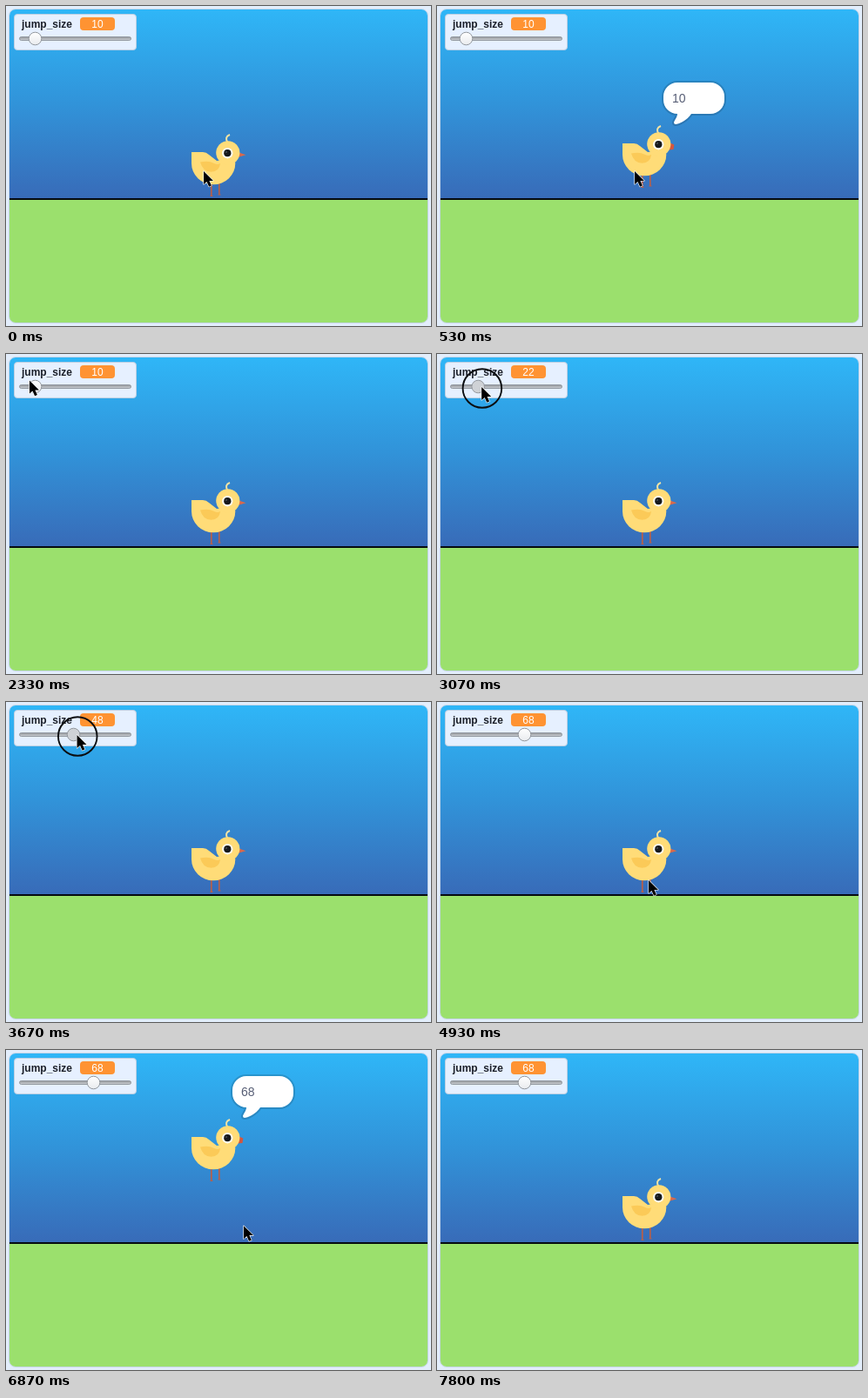
An HTML page for the animation above (7990 ms loop, 488 by 368 pixels).

```html
<!DOCTYPE html>
<html lang="en">
<head>
<meta charset="utf-8">
<title>Jumping chick</title>
<style>
  html, body { margin: 0; width: 100%; height: 100%; overflow: hidden; background: #e3eefc; }
  svg { display: block; width: 488px; height: 368px; }
  text { font-family: "Liberation Sans", Arial, sans-serif; }
</style>
</head>
<body>
<svg viewBox="0 0 488 368">
  <defs>
    <linearGradient id="sky" x1="0" y1="0" x2="0" y2="1">
      <stop offset="0" stop-color="#2fb6f7"/>
      <stop offset=".5" stop-color="#3193d9"/>
      <stop offset="1" stop-color="#386bb8"/>
    </linearGradient>
    <linearGradient id="groove" x1="0" y1="0" x2="0" y2="1">
      <stop offset="0" stop-color="#8f9296"/>
      <stop offset="1" stop-color="#cfd3d8"/>
    </linearGradient>
    <linearGradient id="knob" x1="0" y1="0" x2="0" y2="1">
      <stop offset="0" stop-color="#ffffff"/>
      <stop offset="1" stop-color="#e9ebee"/>
    </linearGradient>
    <clipPath id="stage"><rect x="4" y="4" width="480" height="360" rx="7"/></clipPath>
  </defs>

  <rect width="488" height="368" fill="#e3eefc"/>
  <rect x="3.5" y="3.5" width="481" height="361" rx="7.5" fill="none" stroke="#c5d5e8"/>
  <g clip-path="url(#stage)">
    <rect x="4" y="4" width="480" height="218" fill="url(#sky)"/>
    <rect x="4" y="222" width="480" height="142" fill="#9be06d"/>
    <rect x="4" y="221" width="480" height="2" fill="#050a10"/>
  </g>

  <g id="chick">
    <g fill="none" stroke="#b85f48" stroke-width="1.7">
      <path d="M235.8 203V218.5M244.8 203V217"/>
      <path d="M234.5 218.5h3M243.5 217h3" stroke-width="1"/>
    </g>
    <path d="M254.5 157Q250.5 150.5 257 148" fill="none" stroke="#f5e4a4" stroke-width="2"/>
    <path id="beakShut" d="M266 168L275.5 171.3L266 174Z" fill="#d9694b"/>
    <path id="beakOpen" d="M265.5 166.5L272.3 169.5L271.5 175L265.5 175.5Z" fill="#d3573f"/>
    <path d="M213 168H226Q230 168 233 171L242 178L262 176Q263.3 179 263.3 181A25.1 24.2 0 0 1 213 181Z" fill="#ffdc78"/>
    <circle cx="254.8" cy="168.8" r="13.6" fill="#ffdc78"/>
    <path d="M223 179.5Q233 177.5 238 180.5Q242 183 246 181Q245 190.5 235.5 190.8Q226 190.5 223 179.5Z" fill="#fbca58"/>
    <circle cx="254.3" cy="169.2" r="6.2" fill="#fffdf2"/>
    <circle cx="254.3" cy="169.2" r="4.1" fill="#17191c"/>
    <circle cx="253" cy="168" r=".8" fill="#69737b"/>
  </g>

  <g id="bubble">
    <path d="M276 124A16 16 0 0 1 260 108V104A16 16 0 0 1 276 88H314A16 16 0 0 1 330 104V108A16 16 0 0 1 314 124H292C287 132 277 136 274 136Q272 136 272 134C272 132 276 128 276 124Z"
      fill="#fff" stroke="#000" stroke-opacity=".15" stroke-width="4" paint-order="stroke"/>
    <text id="speech" x="270" y="111" font-size="14" fill="#575e75"></text>
  </g>

  <rect x="9.5" y="9.5" width="140" height="41" rx="3.5" fill="#e6f0ff" stroke="#bccfe3"/>
  <text x="18" y="24.5" font-size="12" font-weight="bold" fill="#1b1f28">jump_size</text>
  <rect x="85" y="13" width="40" height="15" rx="4" fill="#ff9332"/>
  <text id="value" x="105" y="24.5" font-size="12" text-anchor="middle" fill="#fff"></text>
  <rect x="15.5" y="35.5" width="128" height="4" rx="2" fill="url(#groove)" stroke="#8d9299" stroke-width=".9"/>
  <circle id="thumb" cy="37.5" r="7.3" stroke="#92979d"/>

  <g id="cursor">
    <circle id="ring" cx=".7" cy="1.5" r="22.3" fill="none" stroke="#0b0d10" stroke-width="1.9"/>
    <path d="M0 0V15L3.5 11.9L6.1 17.7L8.9 16.5L6.4 10.9H11Z" fill="#000" stroke="#fff" stroke-width="1.2" stroke-linejoin="round" paint-order="stroke"/>
  </g>
</svg>
<script>
const LOOP = 7990;
const $ = id => document.getElementById(id);

// Pointer path: time, x, y
const path = [
  [0, 227, 190], [600, 227, 190], [1250, 135, 146.5], [1500, 135, 146.5],
  [2330, 27, 30.5], [2600, 37.5, 38], [2800, 37.5, 38],
  [3670, 81.5, 38], [4130, 104.5, 38], [4330, 104.5, 38],
  [4930, 243, 205], [5150, 242, 197], [6670, 242, 197], [7600, 500, 240]
];
const presses = [[130, 270], [2670, 4230], [5150, 5290]];
const jumps = [[230, 2230], [5250, 7230]];
const drag = { from: 2670, to: 4230, grip: 4 };

const within = (t, spans) => spans.some(([a, b]) => t >= a && t < b);
const show = (id, on) => $(id).setAttribute("visibility", on ? "inherit" : "hidden");
const move = (id, x, y) => $(id).setAttribute("transform", `translate(${x} ${y})`);

function pointer(t) {
  const i = path.findIndex(k => k[0] > t);
  if (i < 0) return path[path.length - 1].slice(1);
  const [t0, x0, y0] = path[i - 1], [t1, x1, y1] = path[i];
  let k = (t - t0) / (t1 - t0);
  if (t < drag.from || t > drag.to) k = k * k * (3 - 2 * k);
  return [x0 + (x1 - x0) * k, y0 + (y1 - y0) * k];
}

function draw(t) {
  const [x, y] = pointer(t);
  const held = Math.min(Math.max(t, drag.from), drag.to);
  const thumbX = pointer(held)[0] - drag.grip;
  const size = Math.round((thumbX - 21.9) / 1.155);
  const up = within(t, jumps);
  const dragging = t >= drag.from && t < drag.to;

  $("value").textContent = size;
  $("speech").textContent = size;
  $("thumb").setAttribute("cx", thumbX);
  $("thumb").setAttribute("fill", dragging ? "#cfd2d6" : "url(#knob)");

  move("chick", 0, up ? -size : 0);
  show("beakShut", !up);
  show("beakOpen", up);
  move("bubble", 0, 10 - size);
  show("bubble", up);

  move("cursor", x, y);
  show("cursor", x < 488);
  show("ring", within(t, presses));
}

const start = performance.now();
function tick() {
  draw((performance.now() - start) % LOOP);
  requestAnimationFrame(tick);
}
tick();
</script>
</body>
</html>
```
